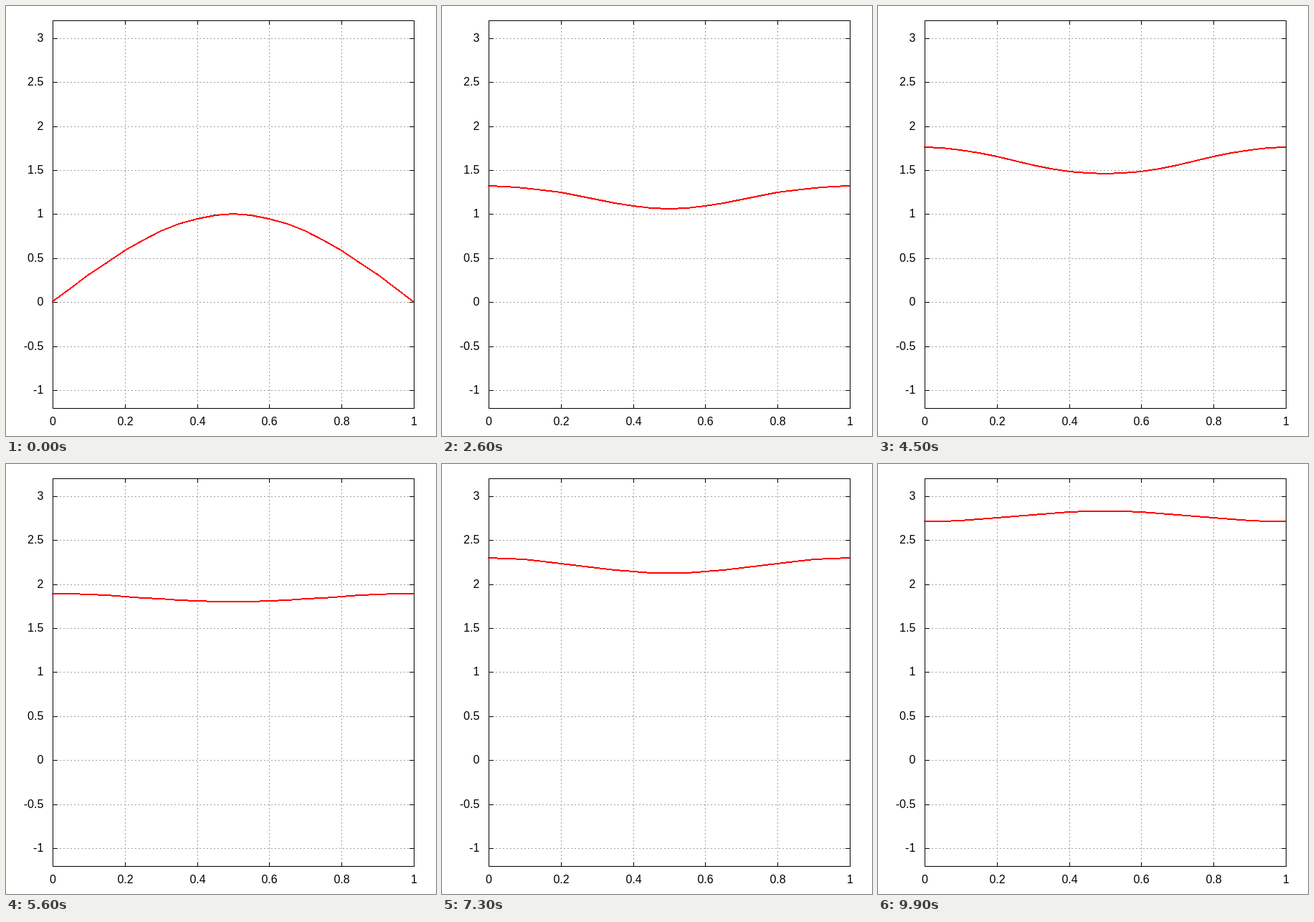
An HTML page for the animation above (10000 ms loop, 600 by 600 pixels).

```html
<!DOCTYPE html>
<html lang="en">
<head>
<meta charset="utf-8">
<title>Damped wave</title>
<style>
  html, body { margin: 0; width: 100%; height: 100%; overflow: hidden; background: #fff; }
  svg { display: block; width: 600px; height: 600px; }
  path, polyline { fill: none; shape-rendering: crispEdges; }
  text { font: 16px "Liberation Sans", Arial, sans-serif; fill: #000; }
</style>
</head>
<body>
<svg viewBox="0 0 600 600">
  <path id="grid" stroke="#a0a0a0" stroke-dasharray="2 3"/>
  <path id="axes" stroke="#000"/>
  <g id="labels"></g>
  <polyline id="curve" stroke="#f00" stroke-width="2"/>
</svg>
<script>
const LEFT = 65, RIGHT = 569, TOP = 20, BOTTOM = 561, TICK = 6;
const FRAME_MS = 100, FRAMES = 100, CELLS = 20;
const byId = id => document.getElementById(id);

const px = x => Math.round(LEFT + (RIGHT - LEFT) * x);
const py = u => BOTTOM - Math.round((BOTTOM - TOP) * (u + 1.2) / 4.4 + 1e-6);
const hLine = (x1, x2, y) => `M${x1} ${y + 0.5}H${x2}`;
const vLine = (x, y1, y2) => `M${x + 0.5} ${y1}V${y2}`;

function addLabel(value, x, y, anchor) {
  const text = document.createElementNS("http://www.w3.org/2000/svg", "text");
  text.setAttribute("x", x);
  text.setAttribute("y", y);
  text.setAttribute("text-anchor", anchor);
  text.textContent = value;
  byId("labels").append(text);
}

function drawPlot() {
  let grid = "";
  let axes = hLine(LEFT, RIGHT + 1, TOP) + hLine(LEFT, RIGHT + 1, BOTTOM) +
             vLine(LEFT, TOP, BOTTOM) + vLine(RIGHT, TOP, BOTTOM);
  for (let i = 0; i <= 5; i++) {
    const x = px(i / 5);
    if (i > 0 && i < 5) grid += vLine(x, TOP, BOTTOM);
    axes += vLine(x, TOP, TOP + TICK) + vLine(x, BOTTOM - TICK + 1, BOTTOM + 1);
    addLabel(i / 5, x + 0.5, 585, "middle");
  }
  for (let u = -1; u <= 3; u += 0.5) {
    const y = py(u);
    grid += hLine(LEFT, RIGHT, y);
    axes += hLine(LEFT, LEFT + TICK + 1, y) + hLine(RIGHT - TICK, RIGHT + 1, y);
    addLabel(u, 52.3, y + 5, "end");
  }
  byId("grid").setAttribute("d", grid);
  byId("axes").setAttribute("d", axes);
}

// Cosine modes of a damped string with free ends, drifting upwards.
function height(x, n) {
  if (n === 0) return Math.sin(Math.PI * x);
  const rad = Math.PI / 180;
  const mode = k => Math.cos(2 * Math.PI * k * x);
  let u = 0.64 + 0.0215 * n;
  u -= 0.43 * Math.exp(-0.02 * n) * Math.cos((36.36 * n + 15) * rad) * mode(1);
  u -= 0.085 * Math.exp(-0.09 * n) * Math.cos(69 * n * rad) * mode(2);
  for (let k = 3; k < 9; k++) {
    const size = 4 / (Math.PI * (4 * k * k - 1));
    u -= size * Math.exp(-0.02 * k * k * n) * Math.cos(34 * k * n * rad) * mode(k);
  }
  return u;
}

function drawCurve(n) {
  const points = [];
  for (let i = 0; i <= CELLS; i++) {
    const x = i / CELLS;
    points.push(`${i ? px(x) : LEFT - 1},${py(height(x, n))}`);
  }
  byId("curve").setAttribute("points", points.join(" "));
}

const start = performance.now();
let shown = -1;
function tick() {
  const n = Math.floor((performance.now() - start) / FRAME_MS) % FRAMES;
  if (n !== shown) drawCurve(shown = n);
  requestAnimationFrame(tick);
}

drawPlot();
tick();
</script>
</body>
</html>
```
